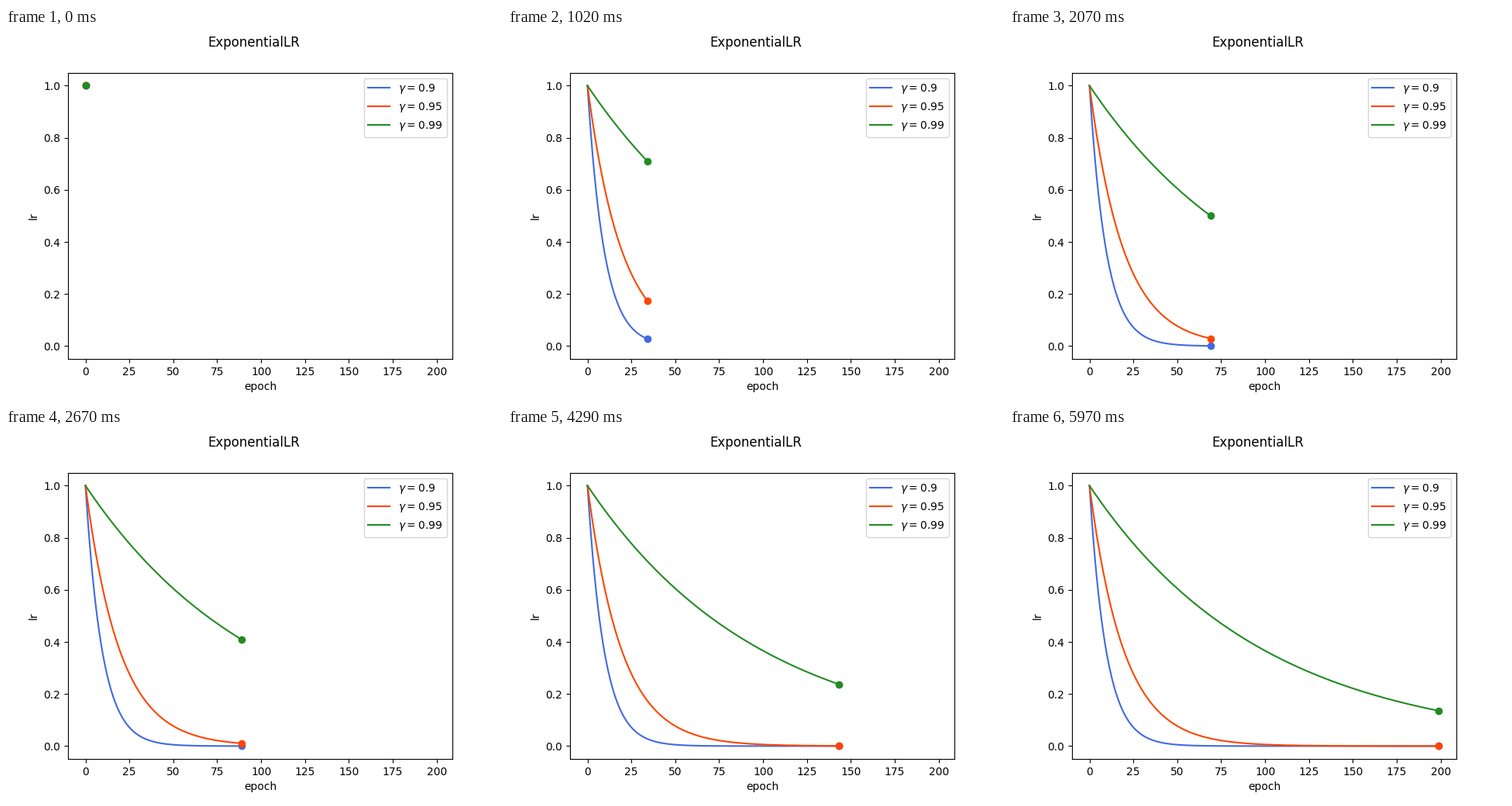
A matplotlib script for the animation above (6 s loop, 640x480 px).

```python
import numpy as np
import matplotlib.pyplot as plt
from matplotlib.animation import FuncAnimation

EPOCHS = 200
CURVES = [(0.9, "royalblue"), (0.95, "orangered"), (0.99, "forestgreen")]

epochs = np.arange(EPOCHS)
fig, ax = plt.subplots(figsize=(6.4, 4.8), dpi=100)
fig.suptitle("ExponentialLR")
ax.set_xlabel("epoch")
ax.set_ylabel("lr")

# Default 5 % margins around the full data range
pad = 0.05 * (EPOCHS - 1)
ax.set_xlim(-pad, EPOCHS - 1 + pad)
ax.set_ylim(-0.05, 1.05)

tracks = []
for gamma, color in CURVES:
    line, = ax.plot([], [], color=color, label=rf"$\gamma=${gamma}")
    dot, = ax.plot([], [], "o", color=color)
    tracks.append((gamma ** epochs, line, dot))
ax.legend(loc="upper right")


def update(epoch):
    for lr, line, dot in tracks:
        line.set_data(epochs[:epoch + 1], lr[:epoch + 1])
        dot.set_data([epoch], [lr[epoch]])
    return [artist for _, *pair in tracks for artist in pair]


anim = FuncAnimation(fig, update, frames=EPOCHS, interval=30,
                     repeat=True, repeat_delay=0)
plt.show()
```
